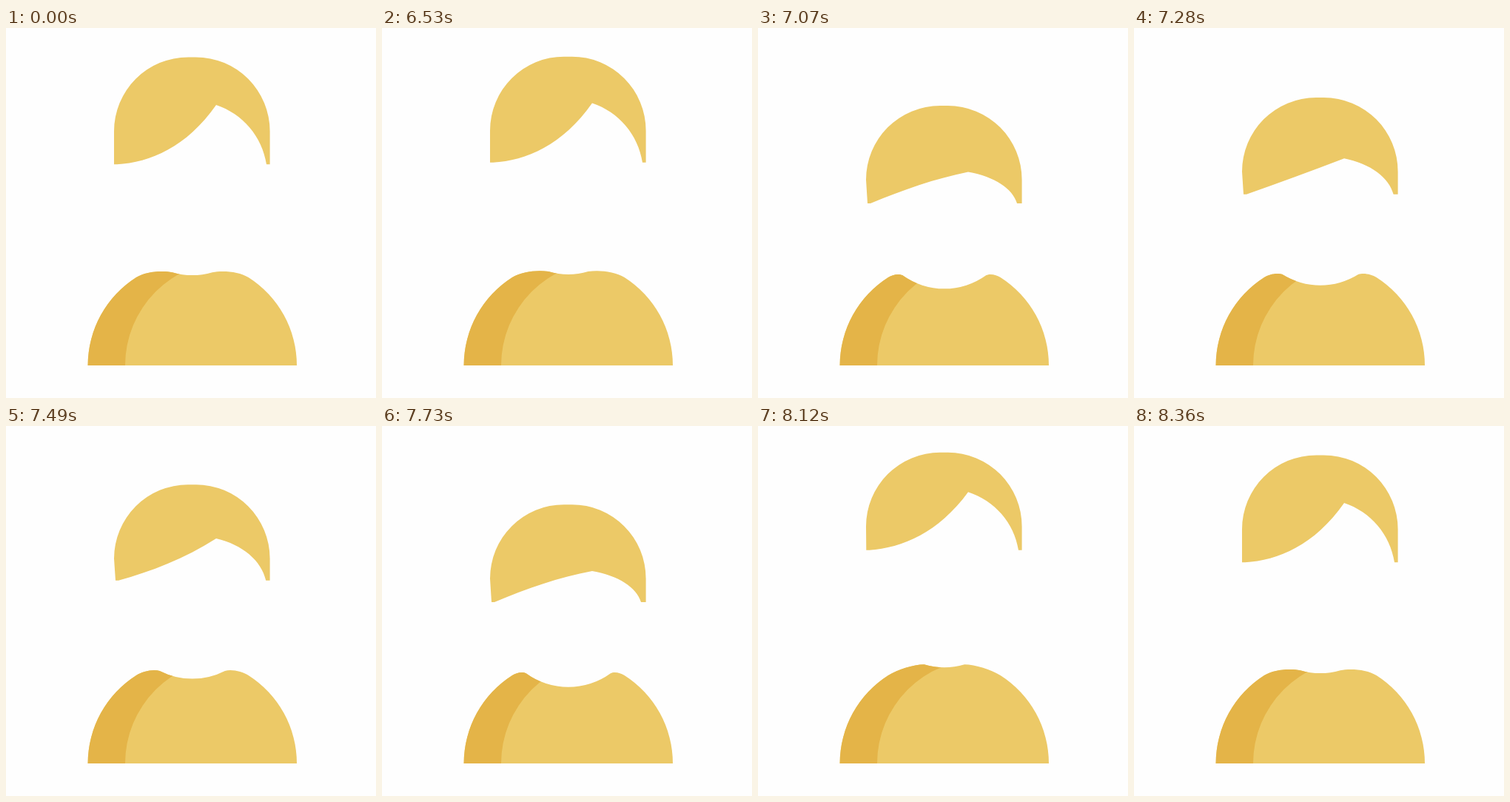
Write an HTML page that moves like this. It is 500x500 px and loops after 8.39 s.

```html
<!DOCTYPE html>
<html lang="en">
<head>
<meta charset="utf-8">
<title>Nodding figure</title>
<style>
  html, body { margin: 0; width: 100%; height: 100%; overflow: hidden; background: #fefefe; }
  svg { display: block; width: 100vw; height: 100vh; }
</style>
</head>
<body>
<svg viewBox="0 0 500 500">
  <defs><clipPath id="torso"><path id="clip"/></clipPath></defs>
  <path id="body" fill="#ecc967"/>
  <path d="M100 456H161A141 141 0 0 1 302 315H100Z" fill="#e4b448" clip-path="url(#torso)"/>
  <path id="hair" fill="#ecc967"/>
</svg>
<script>
const LOOP = 8390, START = 6530, STEP = 30;

const rest = { top: 39.5, part: 104, base: 184.2, chin: 334, half: 27 };
const up = { top: 33, part: 85, base: 165, chin: 325, half: 26 };
const down = { top: 108, part: 199, base: 240, chin: 353.5, half: 58 };
const middle = { top: 78, part: 150, base: 207.5, chin: 341, half: 43.5 };

// Look up, nod twice, overshoot, settle
const nod = [
  [6490, rest], [6666, up], [7125, down], [7450, middle],
  [7780, down], [8165, up], [8360, rest]
];

const clamp = (x, lo, hi) => Math.min(hi, Math.max(lo, x));
const ease = u => u * u * (3 - 2 * u);

function poseAt(t) {
  const i = nod.findIndex(([end]) => t < end);
  if (i < 1) return rest;
  const [t0, a] = nod[i - 1], [t1, b] = nod[i];
  const s = ease((t - t0) / (t1 - t0));
  const pose = {};
  for (const k in a) pose[k] = a[k] + (b[k] - a[k]) * s;
  return pose;
}

function hairPath({ top, part, base }) {
  const px = 284, r = 100;
  const h = base - part;                       // fringe height
  const left = 146 + 2 * clamp((80 - h) / 10, 0, 1);
  const inner = 352 - 2 * ((80 - h) / 38) ** 2;
  const x0 = left + 4, w = px - x0;
  const bow = (h - 48) * 0.735;                // fringe sag, negative when the head is low
  return `M${left} ${base}L146 ${top + r}a${r} ${r} 0 0 1 ${r} ${-r}H256.6a${r} ${r} 0 0 1 ${r} ${r}`
    + `V${base}H${inner}`
    + `C${inner - 6} ${part + 0.53 * h} 320 ${part + 0.15 * h} ${px} ${part}`
    + `C${px - w / 3 + 0.2 * bow} ${part + h / 3 + 1.28 * bow}`
    + ` ${x0 + w / 3} ${base - h / 3 + 1.03 * bow} ${x0} ${base}Z`;
}

function bodyPath({ chin, half }) {
  const mid = 251.8, big = 141.2, r = 97;
  const sx = 176, sy = 337;                    // where the shoulder leaves the big circle
  const cx = mid - half, cy = chin - r + Math.sqrt(r * r - half * half);
  const dx = 0.25 * (cx - sx);
  const x1 = sx + dx, y1 = sy - 0.64 * dx;
  const x2 = cx - 0.3 * (cx - sx), y2 = cy - clamp(0.7 * (cy - 325.5), 0, 2.8);
  const flip = x => 2 * mid - x;
  return `M${mid - big} 456A${big} ${big} 0 0 1 ${sx} ${sy}C${x1} ${y1} ${x2} ${y2} ${cx} ${cy}`
    + `A${r} ${r} 0 0 0 ${flip(cx)} ${cy}`
    + `C${flip(x2)} ${y2} ${flip(x1)} ${y1} ${flip(sx)} ${sy}A${big} ${big} 0 0 1 ${mid + big} 456Z`;
}

const [clip, body, hair] = ['clip', 'body', 'hair'].map(id => document.getElementById(id));

function draw(ms) {
  const t = ms % LOOP;
  const pose = t < START ? rest : poseAt(START + STEP * Math.floor((t - START) / STEP));
  const torso = bodyPath(pose);
  hair.setAttribute('d', hairPath(pose));
  body.setAttribute('d', torso);
  clip.setAttribute('d', torso);
}

const begin = performance.now();
function tick() {
  draw(performance.now() - begin);
  requestAnimationFrame(tick);
}
tick();
</script>
</body>
</html>
```
